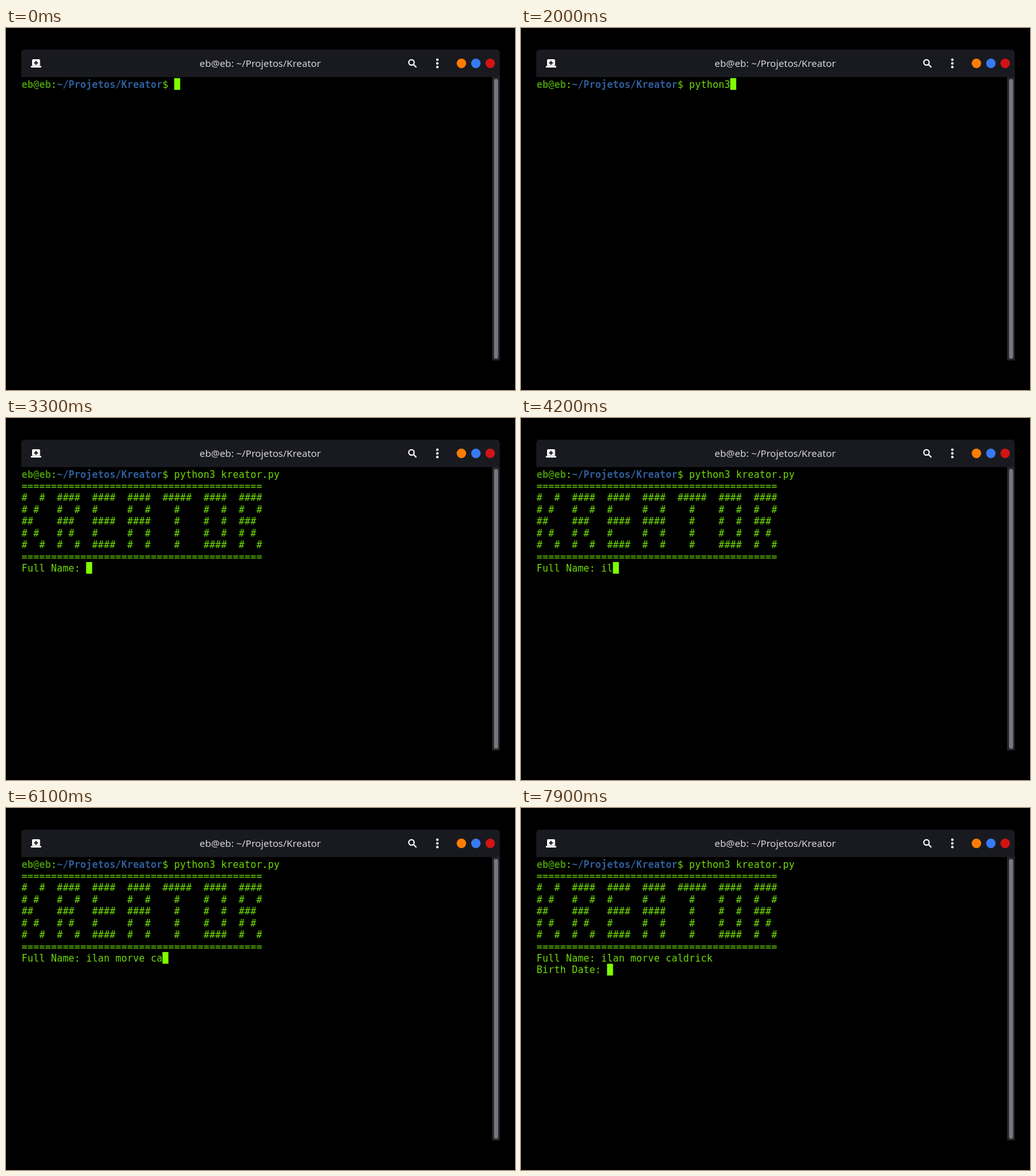
An HTML page with a canvas that plays this animation: 800 by 568 pixels, repeating every 8 s.

```html
<!DOCTYPE html>
<html lang="en">
<head>
<meta charset="utf-8">
<title>Terminal</title>
<style>
  html, body { margin: 0; width: 100%; height: 100%; overflow: hidden; background: #000; }
  canvas { display: block; }
</style>
</head>
<body>
<canvas id="stage" width="800" height="568"></canvas>
<script>
const ctx = document.getElementById('stage').getContext('2d');
const LOOP = 8000;
const LEFT = 24.6, TOP = 78.6, CELL = 9.22, ROW = 18.42;
const MONO = '15px "DejaVu Sans Mono", monospace';
const LIME = '#7fff00', TEXT = '#70dc06', GREEN = '#46900a', BLUE = '#305e9c';

const BANNER = [
  '='.repeat(41),
  '#  #  ####  ####  ####  #####  ####  ####',
  '# #   #  #  #     #  #    #    #  #  #  #',
  '##    ###   ####  ####    #    #  #  ###',
  '# #   # #   #     #  #    #    #  #  # #',
  '#  #  #  #  ####  #  #    #    ####  #  #',
  '='.repeat(41),
];
const USER = 'eb@eb', FOLDER = '~/Projetos/Kreator';
const PROMPT = `${USER}:${FOLDER}$ `;
const RUN_AT = 3300, NEXT_AT = 7100;

// Each key press: the time in ms and the characters it adds.
const COMMAND = [
  [600, 'p'], [900, 'y'], [1200, 't'], [1500, 'h'], [1700, 'o'], [1800, 'n'], [2000, '3'], [2200, ' '],
  [2700, 'k'], [2800, 'r'], [2900, 'e'], [3000, 'a'], [3100, 'tor.py '],
];
const NAME = [
  [3900, 'i'], [4100, 'l'], [4300, 'a'], [4500, 'n'], [4600, ' '],
  [4900, 'm'], [5200, 'o'], [5300, 'r'], [5400, 'v'], [5500, 'e'], [5600, ' '],
  [5900, 'c'], [6100, 'a'], [6200, 'l'], [6400, 'd'], [6500, 'r'], [6700, 'i'], [6800, 'c'], [6900, 'k'],
];
const typed = (keys, t) => keys.filter(([at]) => at <= t).map(([, s]) => s).join('');

function box(x, y, w, h, color, radius = 0) {
  ctx.fillStyle = color;
  ctx.beginPath();
  ctx.roundRect(x, y, w, h, radius);
  ctx.fill();
}

function dot(x, y, r, color) {
  ctx.fillStyle = color;
  ctx.beginPath();
  ctx.arc(x, y, r, 0, 2 * Math.PI);
  ctx.fill();
}

function print(text, row, col = 0, color = TEXT, weight = '') {
  ctx.font = `${weight} ${MONO}`;
  ctx.fillStyle = color;
  ctx.textAlign = 'left';
  [...text].forEach((c, i) => ctx.fillText(c, LEFT + (col + i) * CELL, TOP + 15 + row * ROW));
}

function drawWindow() {
  box(0, 0, 800, 568, '#000');
  box(24, 34, 752, 43, '#191a20', [5, 5, 0, 0]);

  // New tab button
  box(41, 49, 12.5, 10.5, '#fff', 1.5);
  box(39, 59.5, 16.5, 2.5, '#fff', 1);
  box(46.2, 51.5, 2, 6.4, '#191a20');
  box(44, 53.7, 6.4, 2, '#191a20');

  ctx.font = '15.25px "Noto Sans", sans-serif';
  ctx.fillStyle = '#d6d6d8';
  ctx.textAlign = 'center';
  ctx.fillText(`${USER}: ${FOLDER}`, 399.5, 60.7);

  // Search button
  ctx.strokeStyle = '#fff';
  ctx.lineWidth = 2;
  ctx.beginPath();
  ctx.arc(637.3, 54, 4.2, 0, 2 * Math.PI);
  ctx.moveTo(640.5, 57.2);
  ctx.lineTo(645, 61.7);
  ctx.stroke();

  for (const y of [49.7, 55.5, 61.3]) dot(678, y, 2, '#fff');
  dot(715.8, 55.5, 7.4, '#ff7d05');
  dot(738.5, 55.5, 7.4, '#387af2');
  dot(761, 55.5, 7.4, '#d31414');

  box(764, 77, 12, 444.5, '#26262c');
  box(767, 80, 6.5, 439, '#77767e', 3.2);
}

function draw(t) {
  drawWindow();
  print(USER, 0, 0, GREEN, 'bold');
  print(':', 0, USER.length);
  print(FOLDER, 0, USER.length + 1, BLUE, 'bold');
  print('$', 0, PROMPT.length - 2);

  const command = typed(COMMAND, t);
  print(command, 0, PROMPT.length);
  let row = 0, col = PROMPT.length + command.length;

  if (t >= RUN_AT) {
    BANNER.forEach((line, i) => print(line, i + 1));
    const line = 'Full Name: ' + typed(NAME, t);
    row = BANNER.length + 1;
    col = line.length;
    print(line, row);
  }
  if (t >= NEXT_AT) {
    const line = 'Birth Date: ';
    print(line, ++row);
    col = line.length;
  }
  box(LEFT + col * CELL, TOP + row * ROW, 9.4, 18.4, LIME);
}

function tick() {
  draw(performance.now() % LOOP);
  requestAnimationFrame(tick);
}
tick();
</script>
</body>
</html>
```
